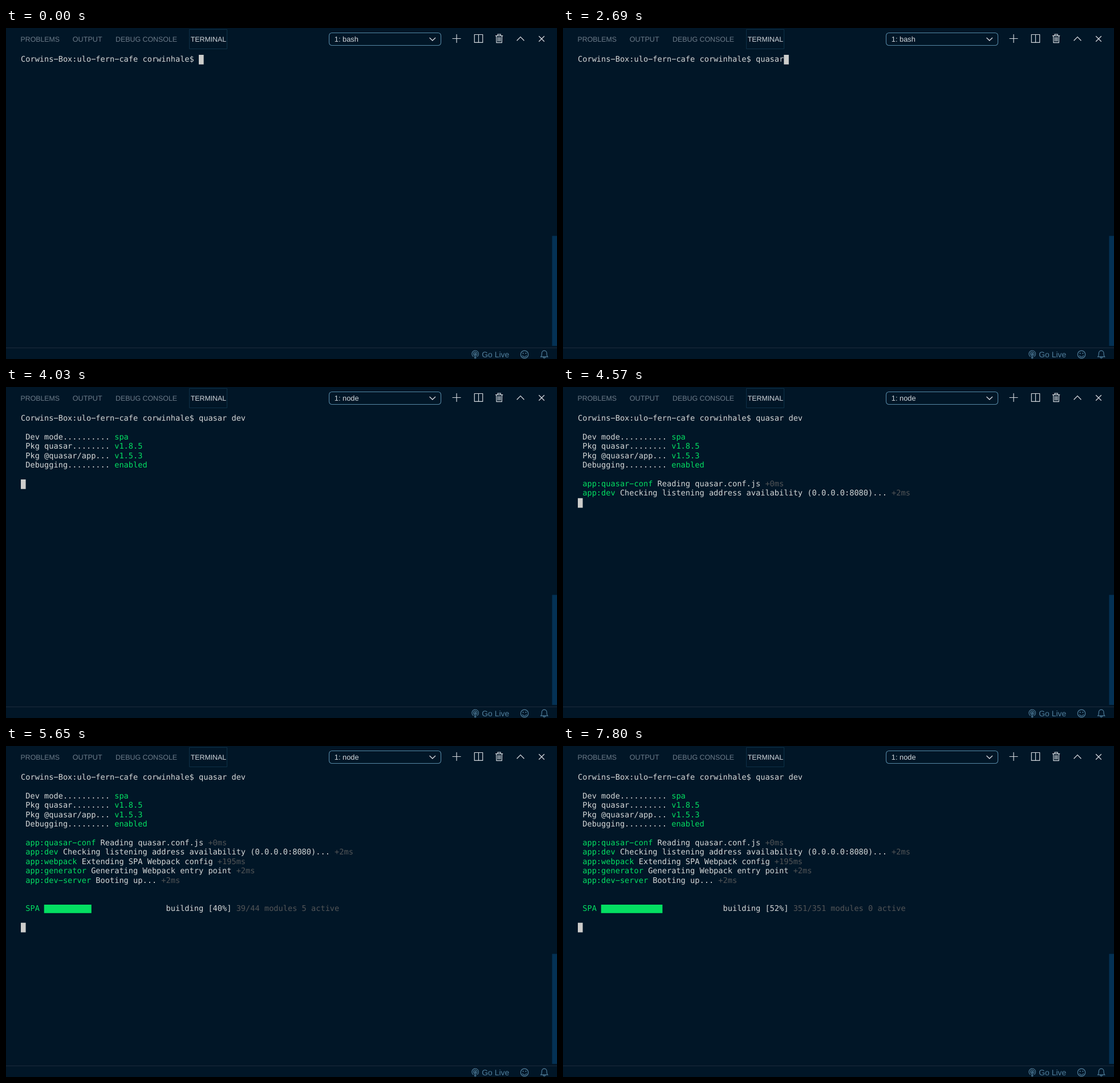
Write an HTML page with a canvas that moves like this. It is 966x580 px and loops after 8000 ms.

```html
<!DOCTYPE html>
<html lang="en">
<head>
<meta charset="utf-8">
<title>Terminal dev server</title>
<style>
  html, body { margin: 0; width: 100%; height: 100%; overflow: hidden; background: #011627; }
  canvas { display: block; width: 966px; height: 580px; }
</style>
</head>
<body>
<canvas id="stage"></canvas>
<script>
const W = 966, H = 580, LOOP = 8000;
const canvas = document.getElementById('stage');
const ctx = canvas.getContext('2d');
const ratio = window.devicePixelRatio || 1;
canvas.width = W * ratio;
canvas.height = H * ratio;
ctx.scale(ratio, ratio);
ctx.textRendering = 'geometricPrecision';

const BG = '#011627', TEXT = '#d6d8d8', GREEN = '#04df62', DIM = '#535557';
const ICON = '#d3d8dd', STATUS = '#527f9c', CURSOR = '#cdcdcb';
const SANS = '"Liberation Sans", Arial, sans-serif';
const MONO = '13.64px "DejaVu Sans Mono", monospace';

// Terminal grid
const LEFT = 26, TOP = 47, CELL = 8.21, ROW = 16.42;
const PROMPT = 'Corwins-Box:ulo-fern-cafe corwinhale$ ';
const COMMAND = 'quasar dev';
const KEY_TIMES = [540, 1070, 1340, 1610, 1880, 2690, 2960, 3230, 3230, 3500];
const RUN = 4030, CHECK = 4570, COMPILE = 4840;

const SETTINGS = [
  ['Dev mode..........', 'spa'],
  ['Pkg quasar........', 'v1.8.5'],
  ['Pkg @quasar/app...', 'v1.5.3'],
  ['Debugging.........', 'enabled']
];
const LOG = [
  ['app:quasar-conf', 'Reading quasar.conf.js', '+0ms'],
  ['app:dev', 'Checking listening address availability (0.0.0.0:8080)...', '+2ms'],
  ['app:webpack', 'Extending SPA Webpack config', '+195ms'],
  ['app:generator', 'Generating Webpack entry point', '+2ms'],
  ['app:dev-server', 'Booting up...', '+2ms']
];
// time, percent, modules done, modules found, active
const BUILD = [
  [5110, 40, 21, 22, 1],
  [5380, 40, 27, 33, 6],
  [5650, 40, 39, 44, 5],
  [5920, 40, 62, 74, 12],
  [6190, 40, 80, 92, 12],
  [6450, 40, 121, 139, 18],
  [6720, 40, 174, 195, 21],
  [6990, 40, 249, 273, 24],
  [7260, 52, 350, 351, 1],
  [7800, 52, 351, 351, 0]
];

function label(text, x, y, size, color) {
  ctx.font = `${size}px ${SANS}`;
  ctx.fillStyle = color;
  ctx.fillText(text, x, y);
}

function stroke(color, width, trace) {
  ctx.strokeStyle = color;
  ctx.lineWidth = width;
  ctx.beginPath();
  trace();
  ctx.stroke();
}

function path(...points) {
  points.forEach(([x, y], i) => i ? ctx.lineTo(x, y) : ctx.moveTo(x, y));
}

function arc(x, y, r, from = 0, to = 2 * Math.PI) {
  ctx.moveTo(x + r * Math.cos(from), y + r * Math.sin(from));
  ctx.arc(x, y, r, from, to);
}

function dot(x, y, r, color) {
  ctx.fillStyle = color;
  ctx.beginPath();
  ctx.arc(x, y, r, 0, 2 * Math.PI);
  ctx.fill();
}

// Writes on the grid and returns the next free column.
function write(text, col, row, color) {
  ctx.font = MONO;
  ctx.fillStyle = color;
  // the wide minus glyph serves as the terminal's hyphen
  [...text.replace(/-/g, '\u2212')].forEach((ch, i) => {
    ctx.fillText(ch, LEFT + (col + i) * CELL, TOP + 12 + row * ROW);
  });
  return col + text.length;
}

function cursor(col, row) {
  ctx.fillStyle = CURSOR;
  ctx.fillRect(LEFT + col * CELL, TOP + row * ROW, 8.6, 16.8);
}

function drawHeader(shell) {
  const tab = '#6c7b89';
  label('PROBLEMS', 25.5, 24.3, 12.35, tab);
  label('OUTPUT', 116.8, 24.3, 12.6, tab);
  label('DEBUG CONSOLE', 192, 24.3, 12.4, tab);
  label('TERMINAL', 323.7, 24.3, 12.35, ICON);
  stroke('#0d3047', 1, () => ctx.rect(321.5, 2.5, 66, 34));

  stroke('#5688a5', 1.1, () => ctx.roundRect(566.5, 8.5, 196, 22, 5));
  label('1: ' + shell, 575.8, 24.2, 12.8, ICON);
  stroke(ICON, 1.3, () => path([742.5, 17], [747.7, 22], [753, 17]));

  stroke(ICON, 1.2, () => {
    path([782.5, 18.5], [797.5, 18.5]);
    path([790, 11], [790, 26]);
  });
  stroke(ICON, 1.2, () => {
    ctx.rect(821.3, 11.5, 14.4, 13.8);
    path([828.5, 11.5], [828.5, 25.3]);
  });
  stroke(ICON, 1.2, () => {
    path([858, 13.6], [871.2, 13.6]);
    path([862, 13.4], [862, 11.2], [867.2, 11.2], [867.2, 13.4]);
    path([859.7, 13.8], [859.9, 25.6], [869.3, 25.6], [869.5, 13.8]);
    for (const x of [862.4, 864.6, 866.8]) path([x, 16], [x, 23.6]);
  });
  stroke(ICON, 1.3, () => path([895.6, 22.2], [902, 15.6], [908.4, 22.2]));
  stroke(ICON, 1.3, () => {
    path([934.2, 14.2], [943.8, 23.8]);
    path([943.8, 14.2], [934.2, 23.8]);
  });
}

function drawStatus() {
  ctx.fillStyle = '#043154';
  ctx.fillRect(957.4, 364.3, 8.6, 192.7);
  ctx.fillStyle = '#1c2b3b';
  ctx.fillRect(0, 560, W, 1);

  stroke(STATUS, 1.1, () => {
    arc(822.7, 571, 5.8, 0.68 * Math.PI, 2.32 * Math.PI);
    arc(822.7, 571, 3.2, 0.72 * Math.PI, 2.28 * Math.PI);
    path([821.7, 572], [821.7, 578.4], [823.7, 578.4], [823.7, 572]);
  });
  dot(822.7, 571, 1.4, STATUS);
  label('Go Live', 834.3, 577, 13.9, STATUS);

  stroke(STATUS, 1.2, () => {
    arc(909, 572, 6.7);
    arc(909, 572.4, 3.8, 0.1 * Math.PI, 0.9 * Math.PI);
  });
  dot(906.6, 570, 1, STATUS);
  dot(911.4, 570, 1, STATUS);

  stroke(STATUS, 1.2, () => {
    ctx.moveTo(937.8, 576.2);
    ctx.quadraticCurveTo(939.4, 574.5, 939.4, 570);
    ctx.arc(943.7, 569.6, 4.3, Math.PI, 0);
    ctx.quadraticCurveTo(948, 574.5, 949.6, 576.2);
    ctx.closePath();
    arc(943.7, 576.6, 1.8, 0, Math.PI);
  });
}

function drawLog(count) {
  LOG.slice(0, count).forEach(([scope, message, delay], i) => {
    const row = 7 + i;
    let col = write(scope, 1, row, GREEN);
    col = write(message, col + 1, row, TEXT);
    write(delay, col + 1, row, DIM);
  });
}

function drawProgress(t) {
  const row = 14;
  write('SPA', 1, row, GREEN);
  const step = BUILD.filter(([start]) => t >= start).pop();
  if (!step) {
    write('compiling [0%]', 31, row, TEXT);
    return;
  }
  const [, percent, done, total, active] = step;
  ctx.fillStyle = GREEN;
  ctx.fillRect(LEFT + 5 * CELL - 0.3, 278, Math.round(percent / 4) * CELL + 0.9, 14.8);
  write(`building [${percent}%]`, 31, row, TEXT);
  write(`${done}/${total} modules ${active} active`, 46, row, DIM);
}

function drawTerminal(t) {
  const typed = KEY_TIMES.filter(time => t >= time).length;
  const end = write(PROMPT + COMMAND.slice(0, typed), 0, 0, TEXT);
  if (t < RUN) {
    cursor(end, 0);
    return;
  }
  SETTINGS.forEach(([name, value], i) => {
    write(name, 1, 2 + i, TEXT);
    write(value, 20, 2 + i, GREEN);
  });
  if (t < CHECK) {
    cursor(0, 7);
  } else if (t < COMPILE) {
    drawLog(2);
    cursor(0, 9);
  } else {
    drawLog(LOG.length);
    drawProgress(t);
    cursor(0, 16);
  }
}

const begin = performance.now();

function draw() {
  const t = (performance.now() - begin) % LOOP;
  ctx.fillStyle = BG;
  ctx.fillRect(0, 0, W, H);
  drawHeader(t < RUN ? 'bash' : 'node');
  drawStatus();
  drawTerminal(t);
  requestAnimationFrame(draw);
}

draw();
</script>
</body>
</html>
```
